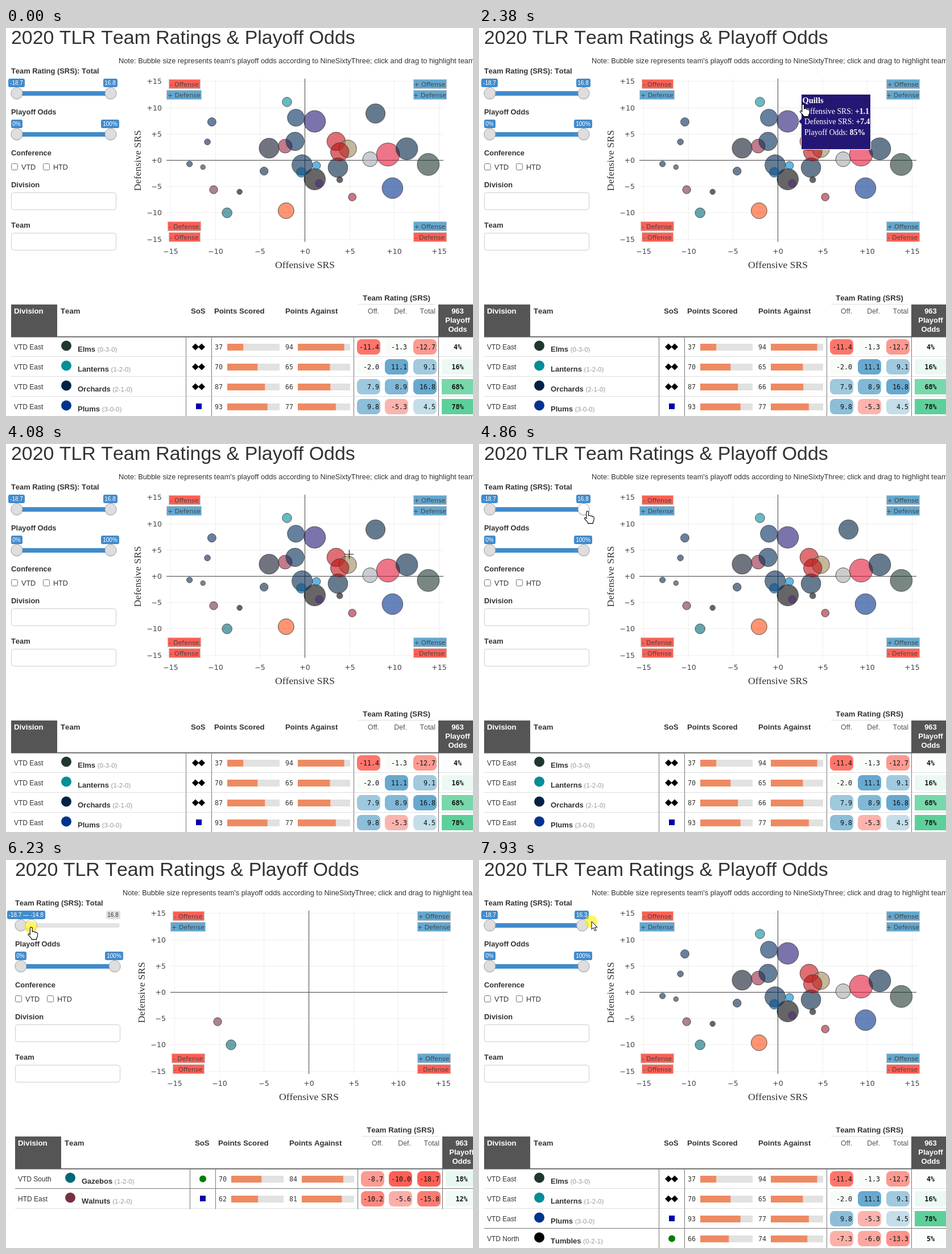
Animation, 821 px wide and 682 px high, one loop 8000 ms. Source, as an HTML page:

```html
<!DOCTYPE html>
<html lang="en">
<head>
<meta charset="utf-8">
<title>Team ratings dashboard</title>
<style>
html, body { margin: 0; width: 100%; height: 100%; overflow: hidden; background: #fff; }
svg { display: block; width: 821px; height: 682px; font-family: "Liberation Sans", Arial, sans-serif; font-kerning: none; }
text { fill: #333; white-space: pre; }
.b { font-weight: 700; }
.m { text-anchor: middle; }
.e { text-anchor: end; }
.serif { font-family: "Liberation Serif", serif; }
.dj { font-family: "DejaVu Sans", sans-serif; }
.mono { font-family: "DejaVu Sans Mono", monospace; }
.w, .w tspan { fill: #fff; }
</style>
</head>
<body>
<svg viewBox="0 0 821 682">
  <g id="page"><g id="fixed"></g><g id="live"></g></g>
  <g id="pointer"></g>
</svg>
<script>
const LOOP = 8000, FPS = 13, BLUE = '#428bca';
const $ = id => document.getElementById(id);

// Teams listed in the table, in its order
const listed = [
  // off, def, odds, colour, name, division, record, schedule, scored, against
  [-11.4, -1.3, 4, '#203731', 'Elms', 'VTD East', '0-3-0', 'hard', 37, 94],
  [-2, 11.1, 16, '#008e97', 'Lanterns', 'VTD East', '1-2-0', 'hard', 70, 65],
  [7.9, 8.9, 68, '#002244', 'Orchards', 'VTD East', '2-1-0', 'hard', 87, 66],
  [9.8, -5.3, 78, '#00338d', 'Plums', 'VTD East', '3-0-0', 'mid', 93, 77],
  [-7.3, -6, 5, '#000000', 'Tumbles', 'VTD North', '0-2-1', 'easy', 66, 74],
  [-2.1, -9.6, 46, '#fb4f14', 'Clocks', 'VTD North', '2-1-0', 'easy', 75, 88],
  [1.1, -3.6, 83, '#000000', 'Pebblers', 'VTD North', '3-0-0', 'easy', 80, 58],
  [1.1, 7.4, 85, '#241773', 'Quills', 'VTD North', '2-1-0', 'easy', 91, 56],
  [-4.56, -2.06, 12, '#03264a', 'Mosses', 'VTD South', '0-3-0', 'hard', 57, 95],
  [-8.7, -10, 18, '#006778', 'Gazebos', 'VTD South', '1-2-0', 'easy', 70, 84],
  [-12.9, -0.7, 6, '#002c5f', 'Ladders', 'VTD West', '0-3-0', 'mid', 45, 70],
  [-10.2, -5.6, 12, '#773141', 'Walnuts', 'HTD East', '1-2-0', 'mid', 62, 81]
];
// Teams that appear as bubbles only
const others = [
  [-1, 8.1, 53, '#002c5f', 'Anvils'], [-10.4, 7.3, 13, '#002c5f'], [-10.9, 3.5, 6.5, '#0b2255'],
  [-4, 2.3, 72, '#101828'], [-2.2, 2.7, 35, '#97233f'], [-1.1, 3.6, 62, '#002a55'],
  [-0.3, -0.9, 76, '#002850'], [-0.4, -2.3, 17, '#005a9c'], [1.3, -1, 12, '#0085ca'],
  [1.6, -4.4, 11, '#4f2683'], [3.7, -1.4, 70, '#002244', 'Kettles'], [3.9, -3.7, 6.5, '#000000'],
  [5.3, -7, 11, '#a71930'], [3.5, 3.6, 62, '#cc1016'], [4.8, 2.2, 56, '#9f8958'],
  [3.9, 1.6, 62, '#c00a10'], [7.3, 0.2, 40, '#a5acaf', 'Thimbles'], [9.3, 1.1, 97, '#e31837'],
  [11.4, 2.2, 87, '#002244', 'Snowcaps'], [13.8, -0.8, 88, '#203731', 'Ribbons']
];
const teams = [...listed, ...others].map(
  ([off, def, odds, color, name, division, record, schedule, scored, against]) =>
    ({ off, def, odds, color, name, division, record, schedule, scored, against, total: off + def }));

// [lowest, median, highest] of each rating column
const scales = { off: [-12.9, -2, 13.8], def: [-10, -1.3, 11.1], total: [-18.7, -2.5, 16.8] };

// [from, to, team] for each hover label
const hovers = [
  [760, 1070, 'Plums'], [1070, 1440, 'Thimbles'], [1440, 1750, 'Kettles'], [1750, 2140, 'Anvils'],
  [2140, 2600, 'Quills'], [2600, 3060, 'Orchards'], [3140, 3600, 'Snowcaps'], [3600, 3900, 'Ribbons']
];
const pointerPath = [
  [460, 814, 370], [700, 738, 316], [850, 690, 290], [1000, 668, 268], [1230, 640, 231], [1500, 590, 243],
  [1650, 566, 225], [1850, 515, 158], [2070, 517, 156], [2150, 530, 155], [2384.6, 570, 134], [2600, 612, 138],
  [2900, 648, 142], [3000, 655, 150], [3230, 695, 196], [3461.5, 734, 219], [3770, 742, 236], [3850, 735, 232],
  [4100, 590, 190], [4350, 340, 135], [4610, 191, 118], [4860, 191, 118], [5010, 190, 118], [5538.5, 112, 118],
  [5770, 78, 118], [6000, 46, 118], [6300, 44, 118], [6770, 46, 118], [6850, 58, 118], [7076.9, 98, 117],
  [7310, 150, 117], [7540, 186, 114], [7923, 198, 108]
];
const handlePath = [
  [5010, 184], [5080, 182], [5538.5, 121.25], [5770, 86], [5850, 74], [6000, 48], [6150, 40], [6300, 35],
  [6770, 35], [6850, 42], [7076.9, 79.42], [7310, 135], [7540, 170], [7700, 181.68]
];

function along(path, t) {
  const i = path.findIndex(p => p[0] > t);
  if (i < 0) return path.at(-1).slice(1);
  if (i === 0) return path[0].slice(1);
  const a = path[i - 1], b = path[i], f = (t - a[0]) / (b[0] - a[0]);
  return a.slice(1).map((v, j) => v + (b[j + 1] - v) * f);
}
const text = (x, y, s, size, cls = '', more = '') =>
  `<text x="${x}" y="${y}" font-size="${size}" class="${cls}" ${more}>${s}</text>`;
const rect = (x, y, w, h, fill, more = '') =>
  `<rect x="${x}" y="${y}" width="${w}" height="${h}" fill="${fill}" ${more}/>`;
const line = (x1, y1, x2, y2, color) =>
  `<path d="M${x1} ${y1}L${x2} ${y2}" stroke="${color}"/>`;
const circle = (x, y, r, fill, more = '') =>
  `<circle cx="${x}" cy="${y}" r="${r}" fill="${fill}" ${more}/>`;
const signed = v => (v < 0 ? '\u2212' : '+') + Math.abs(v);
const chartX = v => 525.4 + v * 15.72;
const chartY = v => 232.5 - v * 9.235;
const radius = odds => 2.06 * Math.sqrt(odds);
const crisp = v => Math.floor(v) + .5;
const mix = (a, b, f) => `rgb(${a.map((v, i) => Math.round(v + (b[i] - v) * f))})`;

function cornerTag(cx, y, label) {
  const w = label === '- Offense' ? 55 : label[0] === '+' && cx < 400 ? 61 : 58;
  return rect(crisp(cx - w / 2), y - .5, w, 16, label[0] === '+' ? '#62a8d0' : '#ff5f54', 'stroke="#c7c7c7"') +
    text(cx, y + 11.7, label, 11, 'dj m', 'style="fill:#444"');
}

function drawFixed() {
  let s = text(9, 28, '2020 TLR Team Ratings &amp; Playoff Odds', 33.9) +
    text(198, 62, "Note: Bubble size represents team's playoff odds according to NineSixtyThree; click and drag to highlight teams", 12.8);
  [['Team Rating (SRS): Total', 80], ['Playoff Odds', 152], ['Conference', 224], ['Division', 280], ['Team', 351]]
    .forEach(([label, y]) => s += text(9, y, label, 12.9, 'b'));
  [[9, 'VTD'], [65, 'HTD']].forEach(([x, label]) =>
    s += rect(x + .5, 238.5, 11, 11, '#fff', 'rx="2" stroke="#767676"') + text(x + 18, 248.5, label, 12.6));
  [289.5, 360.5].forEach(y => s += rect(9.5, y, 184, 30, '#fff', 'rx="4" stroke="#ccc"'));

  for (let v = -15; v <= 15; v += 5) {
    const x = crisp(chartX(v)), y = crisp(chartY(v));
    s += line(x, 89, x, 376, '#eee') + line(282, y, 769, y, '#eee') +
      text(274, y + 4, signed(v), 12.5, 'dj e', 'style="fill:#444"') +
      text(x, 397, signed(v), 12.5, 'dj m', 'style="fill:#444"');
  }
  s += line(282, 232.5, 769, 232.5, '#444') + line(525.5, 89, 525.5, 376, '#444') +
    text(525.5, 422, 'Offensive SRS', 17.6, 'serif m') +
    text(0, 0, 'Defensive SRS', 17.6, 'serif m', 'transform="translate(237 233) rotate(-90)"');

  s += line(619, 485.5, 755, 485.5, '#ddd') + text(686.5, 479, 'Team Rating (SRS)', 13.2, 'b m') +
    rect(9, 486, 81, 57, '#555') + rect(760, 486, 70, 57, '#555') +
    text(14, 502, 'Division', 13.3, 'b w');
  [[96, 'Team'], [325, 'SoS'], [366, 'Points Scored'], [491, 'Points Against']]
    .forEach(([x, label]) => s += text(x, 502, label, 13.2, 'b'));
  [[656, 'Off.'], [705, 'Def.'], [755, 'Total']]
    .forEach(([x, label]) => s += text(x, 502, label, 12.4, 'e', 'style="fill:#555"'));
  ['963', 'Playoff', 'Odds'].forEach((label, i) => s += text(794, 502 + 16 * i, label, 13, 'b m w'));
  s += rect(9, 542, 821, 1.6, '#555');
  $('fixed').innerHTML = s;
}

function tag(x, y, label, fill = BLUE, ink = '#fff') {
  const widths = { '.': 2.8, '-': 3.3, '%': 8.9, ' ': 2.8, '—': 10 };
  const w = Math.round([...label].reduce((sum, c) => sum + (widths[c] || 5.56), 6));
  return rect(Math.round(x - w / 2), y, w, 15, fill, 'rx="3"') +
    text(x, y + 11, label, 10, 'm', `style="fill:${ink}"`);
}

function slider(y, hi, loLabel, hiLabel, limit, active) {
  const knob = (x, fill) =>
    circle(x, y + 1, 11, '#000', 'opacity=".1"') + circle(x, y, 10, fill, 'stroke="#aaa"');
  let s = rect(9, y - 3.5, 184, 8, '#e4e4e4', 'rx="4"') +
    rect(19, y - 3.5, hi - 19, 8, BLUE) + knob(19, '#dedede') + knob(hi, active ? '#fff' : '#dedede');
  if (hi < 155) s += tag(181, y - 25.5, limit, '#e1e1e1', '#333');
  return s + (hi < 48
    ? tag((19 + hi) / 2, y - 25.5, `${loLabel} — ${hiLabel}`)
    : tag(18.5, y - 25.5, loLabel) + tag(hi - 1, y - 25.5, hiLabel));
}

function bubbles(shown) {
  return shown.map(d => circle(chartX(d.off), chartY(d.def), radius(d.odds).toFixed(2), d.color,
    'fill-opacity=".6" stroke="#444" stroke-opacity=".9"')).join('');
}

function hoverLabel(d) {
  const left = d.off > 7.5, x = chartX(d.off), y = chartY(d.def), w = Math.abs(d.off) >= 10 ? 128 : 122;
  const dir = left ? -1 : 1, tip = x + dir * radius(d.odds), edge = crisp(tip + dir * 5);
  const top = crisp(y - 48), far = edge + dir * w, cls = left ? 'serif w e' : 'serif w';
  const rows = [['Offensive SRS', signed(d.off)], ['Defensive SRS', signed(d.def)], ['Playoff Odds', d.odds + '%']];
  return `<path d="M${tip} ${y}L${edge} ${y - 5}V${top}H${far}V${top + 97}H${edge}V${y + 5}Z" fill="${d.color}" stroke="#fff"/>` +
    text(edge + dir * 2, top + 15, d.name, 14.5, cls + ' b') +
    rows.map(([k, v], i) => text(edge + dir * (left ? 2 : 5.5), top + 34 + 18.7 * i,
      `${k}: <tspan class="b">${v}</tspan>`, 13.7, cls)).join('');
}

function scheduleMark(kind, y) {
  if (kind === 'easy') return circle(339, y, 6, '#008000');
  if (kind === 'mid') return rect(334, y - 5.5, 10, 10, '#0000aa');
  return [327, 338].map(x => `<path d="M${x} ${y}l6-6 6 6-6 6z"/>`).join('');
}

function pill(x, y, v, [lo, mid, hi]) {
  const fill = v < mid
    ? mix([248, 252, 248], [255, 95, 84], Math.min(1, (mid - v) / (mid - lo)))
    : mix([248, 252, 248], [103, 169, 207], Math.min(1, (v - mid) / (hi - mid)));
  return rect(x, y - 13.5, 41, 27, fill, 'rx="8"') + text(x + 39, y + 4, v.toFixed(1), 11.6, 'mono e', 'style="fill:#111"');
}

function meter(x, y, value, max) {
  return text(x, y + 4, value, 11.6, 'mono') + rect(x + 22, y - 5.5, 92, 12, '#e1e1df') +
    rect(x + 22, y - 5.5, 92 * value / max, 12, '#ee8a62');
}

function table(shown) {
  const rows = shown.filter(d => d.division);
  return rows.slice(0, 4).map((d, i) => {
    const y = 560.5 + 35 * i, next = rows[i + 1];
    const border = next && next.division !== d.division ? '#777' : '#ddd';
    return rect(766, y - 13.5, 64, 27, mix([255, 255, 255], [74, 203, 142], (d.odds / 85) ** 1.3)) +
      line(9, y + 17, 830, y + 17, border) +
      [316.5, 361.5, 611.5, 760.5].map(x => line(x, y - 17, x, y + 18, '#777')).join('') +
      text(14, y + 4, d.division, 12) + circle(106, y - 2, 9, d.color) +
      text(126, y + 8.5, `${d.name} <tspan font-size="11.6" font-weight="400" fill="#999">(${d.record})</tspan>`, 13, 'b') +
      scheduleMark(d.schedule, y) + meter(367, y, d.scored, 121) + meter(491, y, d.against, 106) +
      pill(617, y, d.off, scales.off) + pill(666, y, d.def, scales.def) + pill(716, y, d.total, scales.total) +
      text(794, y + 4, d.odds + '%', 11.6, 'mono b m', 'style="fill:#111"');
  }).join('');
}

function pointer(t, hovering) {
  if (t < 460) return '';
  const [x, y] = along(pointerPath, t);
  const inPlot = x > 282 && x < 769 && y > 89 && y < 376;
  const onKnob = t > 4590 && t < 7600;
  const body = hovering || onKnob
    ? '<path transform="scale(1.08)" d="M-2 2Q-2 0-.2 0T1.6 2V7.5L2.6 7Q4.5 6.6 5 8Q7.4 7.2 8 9Q10 8.5 10.3 10.5V14Q10 16.5 8.6 18V20H.5V18.6L-5 12.4Q-5.4 10.4-3.4 10.6L-2 12Z" fill="#fff" stroke="#000"/>'
    : inPlot
      ? '<path d="M-8 0H8M0-8V8" stroke="#000"/>'
      : '<path d="M0 0V14L3.2 11 5.6 16.6 8 15.5 5.6 10.2H10Z" fill="#fff" stroke="#000"/>';
  const pressed = t > 5000 ? circle(-1, 0, 11, '#fff000', 'opacity=".6"') : '';
  return `<g transform="translate(${x} ${y})">${pressed}${body}</g>`;
}

function draw(t) {
  const [knob] = along(handlePath, t);
  const max = -18.7 + (knob - 19) * 35.5 / 165;
  const shown = teams.filter(d => d.total <= max + .04);
  const hover = hovers.find(([from, to]) => t >= from && t < to);
  const dragging = t > 4590 && t < 7600;
  $('live').innerHTML =
    slider(114.5, knob, '-18.7', max.toFixed(1), '16.8', dragging) +
    slider(186.5, 184, '0%', '100%', '100%', false) +
    bubbles(shown) +
    cornerTag(313.5, 91, '- Offense') + cornerTag(313, 110, '+ Defense') +
    cornerTag(745, 91, '+ Offense') + cornerTag(745, 110, '+ Defense') +
    cornerTag(313, 341, '- Defense') + cornerTag(313.5, 360, '- Offense') +
    cornerTag(745, 341, '+ Offense') + cornerTag(745, 360, '- Defense') +
    (hover ? hoverLabel(teams.find(d => d.name === hover[2])) : '') +
    table(shown);
  // A short table drops the scrollbar, which recentres the page
  $('page').setAttribute('transform', `translate(${max < -5 ? 7 : 0} 0)`);
  $('pointer').innerHTML = pointer(t, !!hover);
}

let last = -1;
function tick() {
  const step = Math.floor((performance.now() % LOOP + 5) * FPS / 1000);
  if (step !== last) draw((last = step) * 1000 / FPS);
  requestAnimationFrame(tick);
}
drawFixed();
tick();
</script>
</body>
</html>
```
